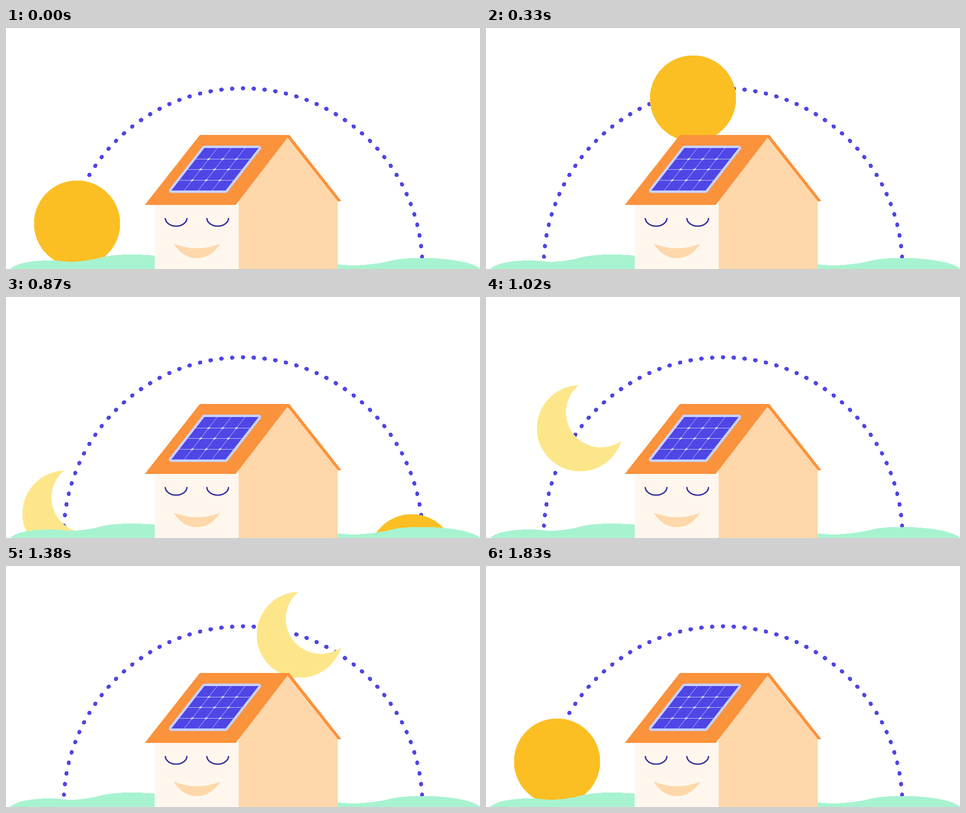
Write an HTML page that moves like this. It is 1049 px wide and 534 px high and loops after 1860 ms.

```html
<!DOCTYPE html>
<html lang="en">
<head>
<meta charset="utf-8">
<title>Solar house, day and night</title>
<style>
  html, body { margin: 0; width: 100%; height: 100%; overflow: hidden; background: #fff; }
  svg { display: block; width: 100%; height: 100%; }
  .crisp { shape-rendering: crispEdges; }
</style>
</head>
<body>
<svg viewBox="0 0 1049 534">
  <path class="crisp" d="M128.2 507.1A397 397 0 0 1 920.8 507.1" pathLength="50" fill="none"
    stroke="#4f46e5" stroke-width="8.8" stroke-linecap="round"
    stroke-dasharray=".05 .95" stroke-dashoffset=".025"/>

  <circle id="sun" class="crisp" r="95.5" fill="#fbbf24"/>
  <path id="moon" class="crisp" fill="#fde68a"
    d="M-2.5-95.5A95.5 95.5 0 1 0 91.5 28A77.65 77.65 0 0 1-2.5-95.5Z"/>

  <g class="crisp" fill="#a7f3d0">
    <path d="M9 534C20 522 55 515 97 515C120 515 128 518 145 518C165 518 190 514 212 508C240 501 290 500 340 505V534Z"/>
    <path d="M725 523L734 524C745 525 756 526 768 526C800 526 835 520 852 515.5C870 511 895 509.5 918 509.5C985 509.5 1040 521 1048 534H725Z"/>
  </g>

  <path d="M329 385H515V534H329Z" fill="#fff7ed"/>
  <path d="M515 534V380L623 240L734 380V534Z" fill="#fed7aa"/>
  <path class="crisp" d="M429 237H627L741 382V384H734.5L623 243L508.5 392H308V391Z" fill="#fb923c"/>

  <path d="M439 266H559L486 360H366Z" fill="#4f46e5" stroke="#c7d2fe" stroke-width="11" stroke-linejoin="round"/>
  <path d="M439 266H559L486 360H366Z" fill="#4f46e5"/>
  <g id="grid" fill="#c7d2fe" stroke="#c7d2fe"></g>

  <g fill="none" stroke="#3730a3" stroke-width="3">
    <path d="M352.5 421A24 18 0 0 0 400.5 421"/>
    <path d="M444.5 421A24 18 0 0 0 492.5 421"/>
  </g>
  <path d="M371 478Q422.5 498 474 478C460 500 442 510 422.5 510C403 510 385 500 371 478Z" fill="#fed7aa"/>
</svg>
<script>
  const $ = id => document.getElementById(id);

  // Panel grid: slanted columns, level rows and a small diamond at each crossing
  const slant = 73 / 94;
  const rows = [290.5, 313.5, 337.5];
  const cols = [467.5, 498.5, 529];
  const colX = (x, y) => x - (y - 266) * slant;
  const line = d => `<path d="${d}" fill="none"/>`;
  $('grid').innerHTML =
    rows.map(y => line(`M${colX(439, y)} ${y}H${colX(559, y)}`)).join('') +
    cols.map(x => line(`M${x} 266L${colX(x, 360)} 360`)).join('') +
    rows.flatMap(y => cols.map(x =>
      `<path d="M${colX(x, y) - 4} ${y + 1.5}l3.5-4 4.5 1-3.5 4Z" stroke="none"/>`)).join('');

  // Both bodies circle the house; angle 0 is the left horizon
  const STEP = 30, LOOP = 1860, SPEED = 0.1985;
  const count = LOOP / STEP;

  function orbit(id, { cx, cy, r, start }) {
    const frames = Array.from({ length: count + 1 }, (_, i) => {
      const time = i < count - 1 ? i * STEP : 0; // last step rests on the opening pose
      const a = (start + time * SPEED) * Math.PI / 180;
      const x = cx - r * Math.cos(a), y = cy - r * Math.sin(a);
      return {
        offset: i / count,
        easing: 'step-end',
        transform: `translate(${x.toFixed(2)}px, ${y.toFixed(2)}px)`
      };
    });
    $(id).animate(frames, { duration: LOOP, iterations: Infinity });
  }

  orbit('sun', { cx: 523, cy: 528.5, r: 378, start: 14.6 });
  orbit('moon', { cx: 525.2, cy: 529, r: 396.7, start: -165.6 });
</script>
</body>
</html>
```
